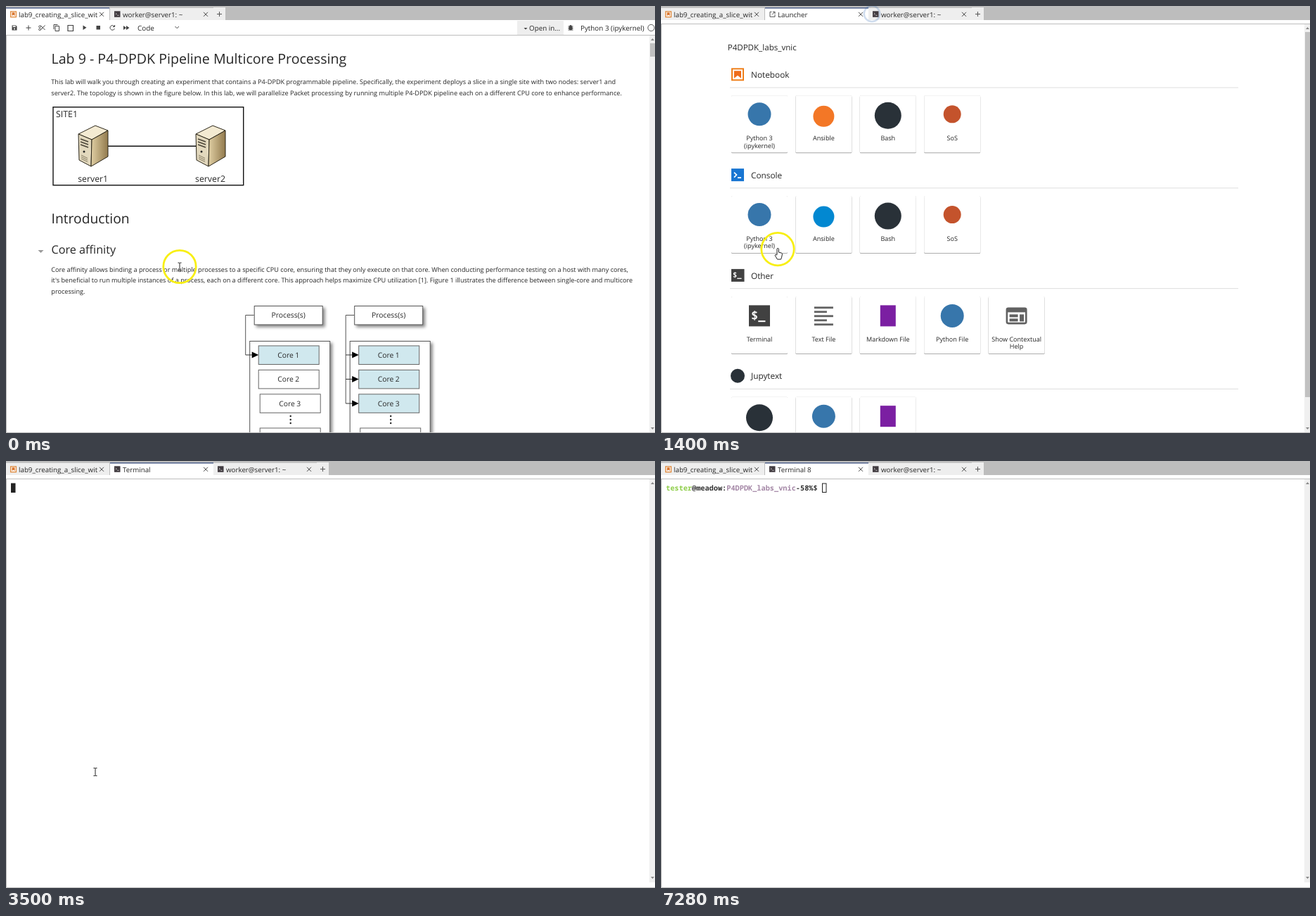
Write an HTML page that moves like this. It is 923x607 px and loops after 7.42 s.

```html
<!DOCTYPE html>
<html lang="en">
<head>
<meta charset="utf-8">
<title>Opening a terminal</title>
<style>
  html, body { margin: 0; width: 100%; height: 100%; overflow: hidden; background: #fff; }
  svg { display: block; }
  text { font-family: "Open Sans", "Noto Sans", sans-serif; fill: #262626; white-space: pre; text-rendering: geometricPrecision; }
  .heading { font-weight: 500; }
  .mono { font-family: "Noto Sans Mono", "DejaVu Sans Mono", monospace; font-weight: bold; fill: #333; }
  .mono.light { fill: #fff; }
  .card { fill: #fff; filter: drop-shadow(0 1px .7px #0004) drop-shadow(0 0 .7px #0004); }
  .card.hover { filter: drop-shadow(0 1px 2px #0006) drop-shadow(0 0 1px #0004); }
  .box { fill: #fff; stroke: #555; filter: drop-shadow(3px 3px 2px #0007); }
</style>
</head>
<body>
<svg id="stage" width="923" height="607" viewBox="0 0 923 607"></svg>
<script>
const LOOP = 7420, STEP = 140;
const stage = document.getElementById('stage');

// Markup helpers
const text = (x, y, s, size, attrs = '') => `<text x="${x}" y="${y}" font-size="${size}" ${attrs}>${s}</text>`;
const centered = (x, y, s, size) => text(x, y, s, size, 'text-anchor="middle"');
const heading = (x, y, s, size) => text(x, y, s, size, 'class="heading"');
const rect = (x, y, w, h, fill, attrs = '') => `<rect x="${x}" y="${y}" width="${w}" height="${h}" fill="${fill}" ${attrs}/>`;
const disc = (x, y, r, fill) => `<circle cx="${x}" cy="${y}" r="${r}" fill="${fill}"/>`;
const path = (d, stroke = '#444', fill = 'none', attrs = '') => `<path d="${d}" stroke="${stroke}" fill="${fill}" ${attrs}/>`;
const at = (x, y, body) => `<g transform="translate(${x} ${y})">${body}</g>`;

// Tab bar
const bookIcon = rect(.6, .6, 7.8, 7.8, '#fff', 'stroke="#e08a3c" stroke-width="1.3"') + path('M2.5 2H6.5V7L4.5 5.3L2.5 7Z', 'none', '#d9742c');
const shellIcon = rect(0, 0, 8.5, 8.5, '#413b40') + path('M1.8 2.5L3.3 4L1.8 5.5M4.2 6H6.5', '#ddd', 'none', 'stroke-width=".8"');
const launchIcon = path('M3.5 1H1V8H8V5M5 1H8V4M8 1L4 5', '#555');

function tab(x, label, icon, active) {
  return rect(x, 2, 147, 18, active ? '#fff' : '#eee') +
    path(`M${x + 147}.5 2V20`, '#bdbdbd') +
    (active ? rect(x, 2, 147, 1.6, '#56678f') : path(`M${x} 2.5H${x + 147}`, '#c8c8c8')) +
    at(x + 6, 7.3, icon) +
    `<svg x="${x + 18}" width="112" height="22">${text(0, 15.6, label, 9.75)}</svg>` +
    path(`M${x + 133} 8.8l6 6m0 -6l-6 6`, '#444');
}
function tabBar(current, icon) {
  const tabs = [['lab9_creating_a_slice_with_p4', bookIcon, !current], ['worker@server1: ~', shellIcon]];
  if (current) tabs.splice(1, 0, [current, icon, true]);
  const end = tabs.length * 147 + 1;
  return rect(0, 0, 923, 20, '#bdbdbd') + tabs.map((t, i) => tab(i && i * 147 + 1, ...t)).join('') +
    rect(end, 2, 17, 18, '#eee') + path(`M${end + 5} 11.5h7m-3.5 -3.5v7`, '#555');
}
function scrollbar(top, bottom, thumbTop, thumbHeight) {
  return rect(915, top, 8, bottom - top, '#f0f0f0') +
    path(`M917 ${top + 7}l2.5 -3l2.5 3Z`, 'none', '#888') +
    path(`M917 ${bottom - 8}l2.5 3l2.5 -3Z`, 'none', '#888') +
    (thumbHeight ? rect(916, thumbTop, 7, thumbHeight, '#c1c1c1') : '');
}
const frame = top => path(`M0 ${top}.5H923M.5 ${top}V606.5H923`, '#bdbdbd');

// Notebook page
function toolbar() {
  return rect(0, 20, 923, 22, '#fff') +
    path('M8.5 27.5H14L15.5 29V34.5H8.5Z', 'none', '#444') + rect(9.7, 28.3, 4, 1.8, '#fff') + disc(12, 32.5, 1.1, '#fff') +
    path('M28.5 31h7m-3.5 -3.5v7', '#444') +
    path('M49 27.5L55.5 34M55.5 27.5L49 34M48 28a1.4 1.4 0 1 0 .1 0M48 32a1.4 1.4 0 1 0 .1 0') +
    path('M70 28.5h5.5v7h-5.5zM68 33V26.5h5.5') +
    path('M88 27.5h7.5v8h-7.5zM90 27.5h3.5', '#444', 'none', 'stroke-width="1.2"') +
    path('M109.5 27.5V34L114.5 30.8Z', 'none', '#444') + rect(128.5, 28, 5.5, 5.5, '#444') +
    path('M154 29A3.3 3.3 0 1 0 154.4 32M154.6 27V29.6H152') +
    path('M167 28V34L171 31ZM171 28V34L175.5 31Z', 'none', '#444') +
    text(187, 34.6, 'Code', 9.9) + path('M240.5 29l2.7 2.7l2.7 -2.7') +
    rect(727, 21, 66, 20, '#eee') + path('M736.5 31h5l-2.5 2.5Z', 'none', '#444') + text(744, 34.6, 'Open in...', 9.8) +
    path('M799.5 29h7M799.5 31.5h7M799.5 34h7') + disc(803, 31.5, 2.7, '#444') + disc(803, 28.7, 1.7, '#444') +
    text(817, 34.6, 'Python 3 (ipykernel)', 9.83) + '<circle cx="917.5" cy="31" r="4.6" fill="none" stroke="#555"/>';
}
function server(x) {
  const slots = [0, 4, 8].map(y => path(`M3 ${19 + y}l11 4`, '#4a4437', 'none', 'stroke-width="1.5"')).join('');
  const vents = [0, 2.5, 5].map(y => path(`M4 ${42 + y}l9 4.5`, '#7c7258', 'none', 'stroke-width=".9"')).join('');
  return at(x, 170, path('M0 12L24 0L42 7L19 20Z', '#2b2619', '#f3ead2') +
    path('M0 12L19 20L18 58L1 49Z', '#2b2619', '#e2d8bd') +
    path('M19 20L42 7V44L18 58Z', '#2b2619', 'url(#side)') + slots + vents + disc(8, 37, 1.5, '#222'));
}
function coreFigure(x, used) {
  const core = (i, y) => rect(i > 1 ? 20.5 : 18.5, y, 86, 26.5, i < used ? '#d0e8ee' : '#fff', 'stroke="#666"') +
    (i < 3 ? centered(61 + (i > 1 ? 2 : 0), y + 16.8, `Core ${i + 1}`, 10.3) : '');
  const arrow = i => path(`M0 ${496 + 34.5 * i}h12`, '#333') + path(`M9 ${491.5 + 34.5 * i}l9.5 4.5l-9.5 4.5Z`, 'none', '#000');
  const ids = [...Array(used).keys()];
  return at(x, 0, rect(6, 476.5, 114, 160, '#fff', 'class="box"') + rect(12.5, 426.5, 97, 26.5, '#fff', 'class="box"') +
    centered(61, 443, 'Process(s)', 10.4) +
    [0, 1, 2].map(i => at(used > 2 && i > 1 ? -2 : 0, 0, core(i, 483 + 34.4 * i))).join('') + core(3, 600) +
    path(`M12 439.5H0V${496 + 34.5 * (used - 1)}`, '#555') + ids.map(arrow).join('') +
    [583, 588, 593].map(y => disc(64, y, 1.2, '#222')).join(''));
}
function notebook() {
  const lines = [
    [111.2, 'This lab will walk you through creating an experiment that contains a P4-DPDK programmable pipeline. Specifically, the experiment deploys a slice in a single site with two nodes: server1 and'],
    [126.6, 'server2. The topology is shown in the figure below. In this lab, we will parallelize Packet processing by running multiple P4-DPDK pipeline each on a different CPU core to enhance performance.'],
    [378, 'Core affinity allows binding a process or multiple processes to a specific CPU core, ensuring that they only execute on that core. When conducting performance testing on a host with many cores,'],
    [393.4, "it's beneficial to run multiple instances of a process, each on a different core. This approach helps maximize CPU utilization [1]. Figure 1 illustrates the difference between single-core and multicore"],
    [408.8, 'processing.']];
  return heading(64.5, 82, 'Lab 9 - P4-DPDK Pipeline Multicore Processing', 19.6) +
    heading(64.5, 308.7, 'Introduction', 19.3) + heading(64.5, 352.3, 'Core affinity', 16.2) +
    lines.map(([y, s]) => text(64.3, y, s, 9.13)).join('') +
    rect(67, 143.7, 270.7, 111, '#fff', 'stroke="#111" stroke-width="1.4"') + text(71, 158, 'SITE1', 12.4) +
    path('M145 199.3H270', '#111', 'none', 'stroke-width="1.4"') + server(103) + server(270) +
    centered(123.7, 250, 'server1', 12.3) + centered(290.5, 250, 'server2', 12.3) +
    coreFigure(340.7, 1) + coreFigure(483.2, 3) +
    path('M45.5 347h8l-4 4Z', 'none', '#999', 'id="fold"') +
    toolbar() + scrollbar(42, 607, 53, 19) + frame(41) + tabBar();
}

// Launcher page
const python = disc(0, 0, 16.5, '#3776ab'), bash = disc(0, 2, 19, '#293138'), sos = disc(0, 0, 12.5, '#c4532c');
const ansible = color => disc(0, 3, 15, color);
const markdown = rect(-11, -15, 22, 30, '#7b1fa2');
const terminalIcon = rect(-15, -15, 30, 30, '#414141') + text(-12, 5.5, '$_', 17, 'class="mono light"');
const textIcon = [-13, -7, -1, 5, 11].map((y, i) => rect(-13.5, y, i % 2 ? 18 : 27, 2.8, '#616161')).join('');
const helpIcon = rect(-13.7, -10.7, 27.4, 21.4, 'none', 'stroke="#616161" stroke-width="2.6" rx="2"') + rect(-13, -11, 26, 6, '#616161') +
  rect(-10, -2, 12, 4, '#616161') + rect(-10, 4, 12, 4, '#616161') + rect(4.5, -2, 6, 10, '#616161');

function launcher() {
  const kernels = color => [['Python 3|(ipykernel)', python], ['Ansible', ansible(color)], ['Bash', bash], ['SoS', sos]];
  const sections = [
    ['Notebook', rect(1, 1, 16, 16, '#fff', 'stroke="#ef7f1a" stroke-width="2"') + path('M4 4H14V14.5L9 10.5L4 14.5Z', 'none', '#ef6c1a'), kernels('#f37726')],
    ['Console', rect(0, 0, 18, 18, '#1976d2') + path('M4 5.5l3.5 3.5l-3.5 3.5M9 13h5', '#fff', 'none', 'stroke-width="1.6"'), kernels('#0288d1')],
    ['Other', rect(0, 0, 18.5, 18, '#414141') + text(2, 12.5, '$_', 10.5, 'class="mono light"'),
      [['Terminal', terminalIcon], ['Text File', textIcon], ['Markdown File', markdown], ['Python File', python], ['Show Contextual|Help', helpIcon]]],
    ['Jupytext', disc(9, 9, 10, '#293138'), [['', bash], ['', python], ['', markdown]]]];
  const card = ([label, icon], i, row) => at(100 + 91.4 * i, 127.3 + 142.8 * row,
    rect(0, 0, 80, 81, '#fff', `class="card" rx="1.5" ${row === 2 && !i ? 'id="target"' : ''}`) +
    at(40, row > 1 ? 27.5 : 26.5, icon) + label.split('|').map((s, n) => centered(40, 64 + 10.3 * n, s, 9.05)).join(''));
  return text(94.7, 63, 'P4DPDK_labs_vnic', 11.55) +
    sections.map(([name, icon, cards], row) => at(0, 142.8 * row,
      at(100, 88.3, icon) + text(128, 102, name, 11.8) + path('M98 116H821', '#dedede')) +
      cards.map((c, i) => card(c, i, row)).join('')).join('') +
    scrollbar(26, 607, 37, 519) + frame(25) + tabBar('Launcher', launchIcon);
}

// Terminal page
function terminal() {
  const span = (s, color) => `<tspan style="fill:${color}">${s}</tspan>`;
  return text(7, 42.2, `${span('tester', '#8fce4a')}@meadow:${span('P4DPDK_labs_vnic', '#a487a6')}-58%$`, 10.28, 'class="mono" id="prompt"') +
    rect(7.5, 32, 5.5, 12.5, '#222', 'id="caret" stroke="#222"') +
    scrollbar(26, 599) + frame(25) + tabBar('<tspan id="title">Terminal</tspan>', shellIcon);
}

stage.innerHTML = `
  <defs><linearGradient id="side"><stop stop-color="#e0cfa4"/><stop offset="1" stop-color="#927a4d"/></linearGradient></defs>
  <g id="notebook">${notebook()}</g><g id="launcher">${launcher()}</g><g id="terminal">${terminal()}</g>
  <circle id="ripple" fill="none" stroke="#2b66b1" stroke-width="2.5"/>
  <g id="pointer">
    <circle id="halo" r="23.2" fill="none" stroke="#f8ef13" stroke-width="2.8"/>
    ${path('M-2.5 -5.5h2l.5 .5l.5 -.5h2M0 -5V5M-2.5 5.5h2l.5 -.5l.5 .5h2', '#222', 'none', 'id="beam"')}
    ${path('M-1 -3V8.5L1.7 6L3.5 10L5.3 9.2L3.5 5.3H7Z', '#222', '#fff', 'id="arrow"')}
    ${path('M-1 8V0a1.2 1.2 0 0 1 2.4 0V4.5l4 1q1.2 .4 1 2L5.6 11.5l-1 3H-.5L-4 8.7q.7 -1.8 3 -.2', '#222', '#fff', 'id="hand"')}
  </g>`;

const $ = id => document.getElementById(id);
const show = (id, on) => $(id).style.display = on ? '' : 'none';

// Pointer stops: step, x, y
const route = [[0, 247, 370.5], [6, 300, 11], [8, 300, 11], [10, 166, 345.6], [13, 127, 442]];
const clicks = [[7, 300, 11], [16, 127, 442]];

function pointerAt(step) {
  const i = route.findIndex(stop => stop[0] > step);
  if (i < 0) return route.at(-1).slice(1);
  const [a, b] = [route[i - 1], route[i]];
  const p = (step - a[0]) / (b[0] - a[0]), e = p * p * (3 - 2 * p);
  return [a[1] + (b[1] - a[1]) * e, a[2] + (b[2] - a[2]) * e];
}

function draw(now) {
  const step = Math.floor(now % LOOP / STEP);
  const within = (from, to) => step >= from && step < to;
  const [x, y] = pointerAt(step);
  const page = step < 8 ? 'notebook' : step < 25 ? 'launcher' : 'terminal';
  for (const name of ['notebook', 'launcher', 'terminal']) show(name, name === page);

  show('fold', y > 330);
  $('target').setAttribute('class', y > 413 ? 'card hover' : 'card');

  show('pointer', step < 28);
  $('pointer').setAttribute('transform', `translate(${x} ${y})`);
  show('halo', step < 7 || within(9, 16));
  const shape = y < 42 ? 'arrow' : page === 'launcher' ? 'hand' : 'beam';
  for (const name of ['beam', 'arrow', 'hand']) show(name, name === shape);

  const click = clicks.find(([start]) => within(start, start + 4));
  show('ripple', click);
  if (click) {
    const age = step - click[0];
    $('ripple').setAttribute('cx', click[1]);
    $('ripple').setAttribute('cy', click[2]);
    $('ripple').setAttribute('r', 7 + 1.4 * age);
    $('ripple').setAttribute('opacity', 1 - .26 * age);
  }

  $('title').textContent = step < 28 ? 'Terminal' : 'Terminal 8';
  show('prompt', step >= 45);
  show('caret', !(within(30, 34) || within(38, 42) || within(49, 52)));
  $('caret').setAttribute('x', step < 45 ? 7.5 : 229.5);
  $('caret').setAttribute('fill', step < 52 ? '#222' : '#fff');
  requestAnimationFrame(draw);
}
requestAnimationFrame(draw);
</script>
</body>
</html>
```
